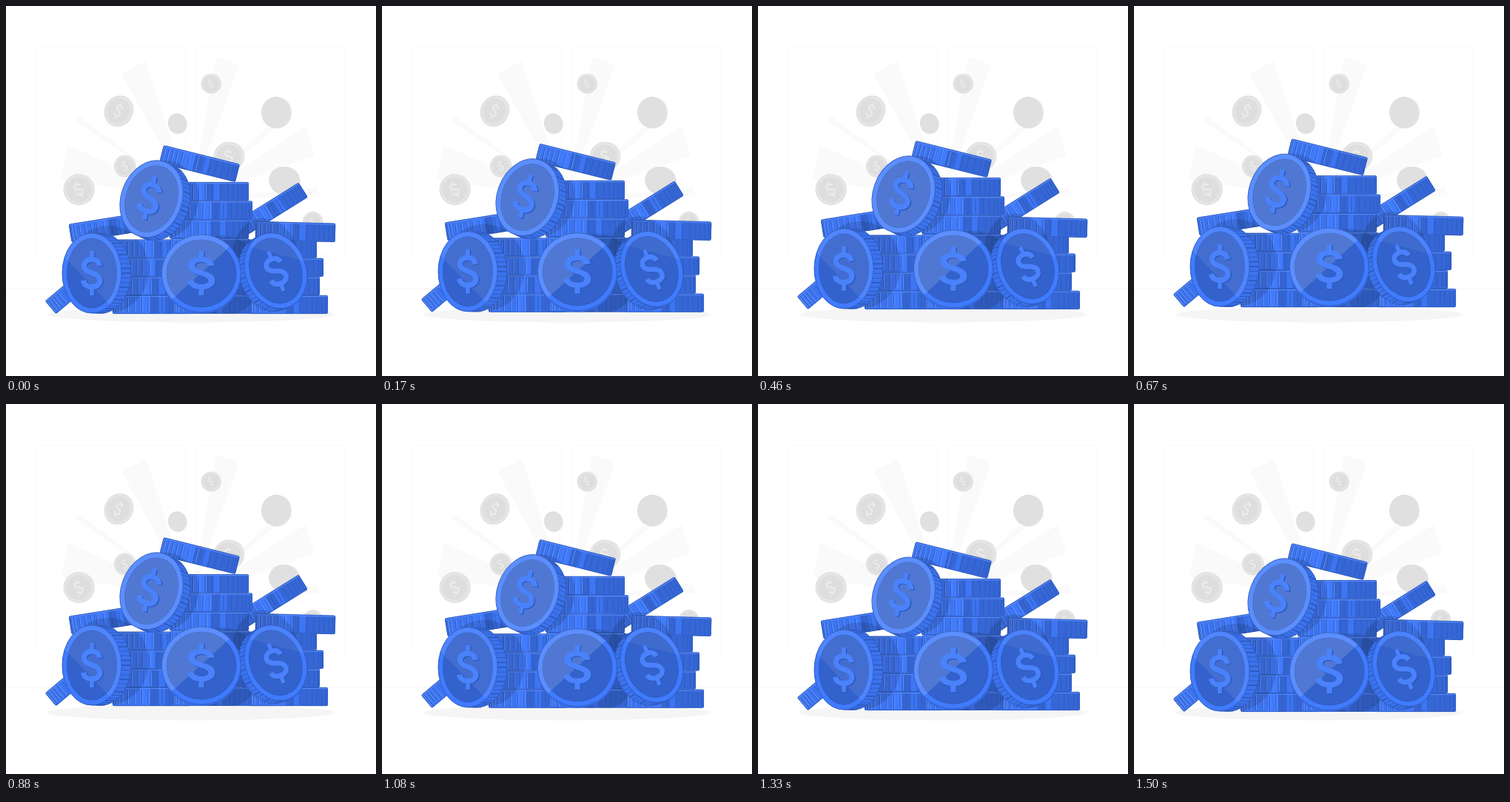
Recreate the animation shown at these times as an HTML page with a canvas. Size 500 px wide and 500 px high, loop 1540 ms.

```html
<!DOCTYPE html>
<html lang="en">
<head>
<meta charset="utf-8">
<title>Coin pile</title>
<style>
html, body { margin: 0; width: 100%; height: 100%; overflow: hidden; background: #fff; }
canvas { display: block; position: absolute; left: 0; top: 0; width: 500px; height: 500px; }
</style>
</head>
<body>
<canvas id="back"></canvas>
<canvas id="pile"></canvas>
<script>
const LOOP = 1540, STEP = 1000 / 24, TAU = Math.PI * 2;
const BLUE = '#407bff', DEEP = '#3362cc', LINE = '#2f5cc0', SHINE = '#6694ff';
const ratio = Math.max(1, window.devicePixelRatio || 1);
let g;

function context(id) {
  const c = document.getElementById(id);
  c.width = c.height = Math.round(500 * ratio);
  const ctx = c.getContext('2d');
  ctx.scale(ratio, ratio);
  return ctx;
}

function at(x, y, deg, draw) {
  g.save();
  g.translate(x, y);
  g.rotate(deg * Math.PI / 180);
  draw();
  g.restore();
}

function oval(x, y, rx, ry, fill, stroke, width = 1) {
  g.beginPath();
  g.ellipse(x, y, rx, ry, 0, 0, TAU);
  if (fill) { g.fillStyle = fill; g.fill(); }
  if (stroke) { g.strokeStyle = stroke; g.lineWidth = width; g.stroke(); }
}

function poly(points, fill) {
  g.beginPath();
  points.forEach(([x, y]) => g.lineTo(x, y));
  g.closePath();
  g.fillStyle = fill;
  g.fill();
}

function segment(x1, y1, x2, y2) {
  g.beginPath();
  g.moveTo(x1, y1);
  g.lineTo(x2, y2);
  g.stroke();
}

// Dollar sign, 28 x 60 at scale 1, centred on the current origin
function dollar(sx, sy, color) {
  g.save();
  g.scale(sx, sy);
  g.strokeStyle = color;
  g.lineWidth = 7;
  g.beginPath();
  g.moveTo(10.5, -10);
  g.bezierCurveTo(9.5, -16, 5, -18.5, 0, -18.5);
  g.bezierCurveTo(-6, -18.5, -10.5, -15.5, -10.5, -10);
  g.bezierCurveTo(-10.5, -4.5, -5, -2, 0, -.3);
  g.bezierCurveTo(5.5, 1.5, 11, 4, 11, 10);
  g.bezierCurveTo(11, 15.5, 6, 18.5, 0, 18.5);
  g.bezierCurveTo(-5.5, 18.5, -10.5, 16, -11.5, 10);
  g.stroke();
  g.lineWidth = 5.5;
  segment(0, -30, 0, -17);
  segment(0, 17, 0, 30);
  g.restore();
}

/* ---------- still background ---------- */

function greyCoin(x, y, rx, ry, deg, side, marked) {
  at(x + side, y, deg, () => oval(0, 0, rx, ry, '#efefef'));
  at(x, y, deg, () => {
    oval(0, 0, rx, ry, '#e0e0e0');
    if (!marked) return;
    oval(0, 0, rx - 1, ry - 1, '#e5e5e5');
    oval(0, 0, rx * .8, ry * .8, '#dedede');
    g.translate(.6, .4);
    dollar(rx / 54, ry / 54, '#d2d2d2');
    g.translate(-.6, -.4);
    dollar(rx / 54, ry / 54, '#ebebeb');
  });
}

function drawBack() {
  g = context('back');
  g.fillStyle = '#fff';
  g.fillRect(0, 0, 500, 500);
  g.strokeStyle = '#fafafa';
  g.lineWidth = 1;
  g.strokeRect(39.5, 55.5, 203, 282);
  g.strokeRect(255.5, 55.5, 202, 282);
  g.strokeStyle = '#f6f6f6';
  segment(0, 382.5, 500, 382.5);

  const rays = [
    [156, 91, 189, 74], [284, 69, 315, 79], [84, 188, 74, 234], [93, 155, 99, 149],
    [405, 163, 417, 202], [352, 164, 363, 166], [421, 245, 423, 256]
  ];
  for (const [a, b, c, d] of rays) poly([[a, b], [c, d], [250, 262]], '#fafafa');

  greyCoin(152, 142, 19, 21.5, 25, 1.5, true);
  greyCoin(277, 105, 13.5, 13.5, -20, .8, true);
  greyCoin(231.5, 159, 12.5, 14, -15, 1);
  greyCoin(365, 144, 20, 21.5, 0, 1.5);
  greyCoin(376, 236, 21, 19, 10, 1.5);
  greyCoin(160.5, 216.5, 14.5, 15, -15, 1, true);
  greyCoin(98.5, 248, 21, 21, -25, .6, true);
  greyCoin(301, 203.5, 20.5, 20, -10, 1.5, true);
  greyCoin(414.5, 291.5, 13.5, 13.5, -10, .8, true);

  oval(250, 417, 194, 10.5, '#f5f5f5');
}

/* ---------- floating pile ---------- */

// Coin seen from the side, centred; seed varies the shading
function edge(x, y, w, h, deg, seed) {
  at(x, y, deg, () => {
    const l = -w / 2, t = -h / 2;
    g.save();
    g.beginPath();
    g.roundRect(l, t, w, h, 2);
    g.clip();
    g.fillStyle = BLUE;
    g.fillRect(l, t, w, h);
    const shift = (seed * 37 % 11) / 100;
    const shade = (from, to, alpha) => {
      g.fillStyle = `rgba(0,0,0,${alpha})`;
      g.fillRect(l + from * w, t, (to - from) * w, h);
    };
    shade(0, .3 + shift, .06);
    shade(.43 + shift, .54 + shift, .18);
    shade(.54 + shift, .62 + shift, .05);
    shade(.62 + shift, 1, .16);
    for (let i = 1; i < 17; i++) {
      const px = -Math.cos(Math.PI * i / 17) * w / 2 + Math.sin(i * 5 + seed);
      g.lineWidth = 1;
      g.strokeStyle = LINE;
      segment(px, t + 3, px, -t - 2);
      if (i > 8) continue;
      g.strokeStyle = SHINE;
      segment(px + 1.1, t + 3, px + 1.1, -t - 2);
    }
    g.fillStyle = '#5b8dff';
    g.fillRect(l, t + .8, w, 1.2);
    g.restore();
    g.beginPath();
    g.roundRect(l + .4, t + .4, w - .8, h - .8, 2);
    g.strokeStyle = LINE;
    g.lineWidth = .9;
    g.stroke();
  });
}

// Level coins, listed as [left, right], stacked downwards from a given top
function stack(top, pitch, seed, coins) {
  coins.forEach(([l, r], i) =>
    edge((l + r) / 2, top + (i + .5) * pitch, r - l, pitch, 0, seed + i));
}

function shadow(x, y, rx, ry, deg) {
  g.globalCompositeOperation = 'source-atop';
  at(x, y, deg, () => oval(0, 0, rx, ry, 'rgba(0,0,0,.13)'));
  g.globalCompositeOperation = 'source-over';
}

// Coin facing the viewer; (dx, dy) is its thickness, light the glossy area
function coin({ x, y, rx, ry, deg, dx, dy, mark, light, gloss }) {
  for (let k = 1; k >= 0; k -= .1) {
    at(x + dx * k, y + dy * k, deg, () => oval(0, 0, rx, ry, '#3c73ee', k === 1 && LINE));
  }
  const rot = deg * Math.PI / 180, cos = Math.cos(rot), sin = Math.sin(rot);
  if (Math.hypot(dx, dy) > 3) {
    for (let i = 0; i < 52; i++) {
      const a = i / 52 * TAU, u = Math.cos(a), v = Math.sin(a);
      const nx = ry * u * cos - rx * v * sin, ny = ry * u * sin + rx * v * cos;
      if (nx * dx + ny * dy <= 0) continue;
      const px = x + rx * u * cos - ry * v * sin, py = y + rx * u * sin + ry * v * cos;
      g.strokeStyle = LINE;
      g.lineWidth = i % 3 ? 1 : 2;
      segment(px, py, px + dx, py + dy);
    }
  }
  at(x, y, deg, () => {
    oval(0, 0, rx, ry, BLUE, LINE);
    oval(0, 0, rx - 6.5, ry - 7, DEEP, LINE);
  });
  g.save();
  g.beginPath();
  g.ellipse(x, y, rx, ry, rot, 0, TAU);
  g.clip();
  poly(light, `rgba(255,255,255,${gloss})`);
  g.restore();
  const [mx, my, tilt, sx, sy] = mark;
  at(mx + 1.5, my + 1.2, tilt, () => dollar(sx, sy, '#2f5bbd'));
  at(mx, my, tilt, () => dollar(sx, sy, '#4a82fb'));
}

function drawPile(lift) {
  g.clearRect(0, 0, 500, 500);
  g.save();
  g.translate(0, lift);

  edge(138, 299, 104, 25, -9, 2);
  edge(100, 374, 104, 23, -40, 5);
  stack(315.6, 25.1, 1, [[150, 256], [147, 253], [148, 254], [144, 250]]);
  edge(261.5, 213, 106, 25, 14, 0);
  edge(357.5, 276, 104, 23.5, -32, 4);
  stack(315.6, 25.1, 6, [[314, 420], [324, 429], [318, 424], [328, 435]]);
  edge(391, 305, 108, 25.5, 1.5, 3);
  stack(238, 25.4, 3, [[222, 328], [227, 333], [221, 328], [222, 329], [224, 331], [222, 328], [225, 331]]);

  shadow(138, 356, 55, 59, 0);
  shadow(211, 262, 49, 54, 18);
  shadow(290, 365, 56, 55, 0);
  shadow(352, 344, 45, 58, -12);

  coin({
    x: 196.6, y: 260.7, rx: 41, ry: 53, deg: 20, dx: 10, dy: 4.5, gloss: .14,
    light: [[140, 200], [260, 200], [260, 320], [140, 320]],
    mark: [194, 259.5, 14, 1, 1]
  });
  coin({
    x: 116, y: 361, rx: 40, ry: 54, deg: 0, dx: 13, dy: 0, gloss: .08,
    light: [[70, 330], [145, 408], [180, 420], [180, 300], [70, 300]],
    mark: [116, 361, 0, 1, 1]
  });
  coin({
    x: 364.4, y: 357.8, rx: 41, ry: 52, deg: -20, dx: -8, dy: 4, gloss: .06,
    light: [[300, 318], [420, 349], [420, 290], [300, 290]],
    mark: [365, 358.5, -21, .95, .95]
  });
  coin({
    x: 264, y: 361.5, rx: 53.5, ry: 52.5, deg: 0, dx: 0, dy: 1.5, gloss: .14,
    light: [[205, 414], [320, 309], [320, 300], [200, 300]],
    mark: [264, 361, 0, 1.27, 1]
  });
  g.restore();
}

// Steady rise, steady fall, short rest
function liftAt(ms) {
  const path = [[0, 0], [735, -9.8], [1480, 0], [LOOP, 0]];
  const i = path.findIndex(([t]) => t > ms);
  const [t0, y0] = path[i - 1], [t1, y1] = path[i];
  return y0 + (y1 - y0) * (ms - t0) / (t1 - t0);
}

drawBack();
g = context('pile');
const start = performance.now();
let last = -1;

function tick() {
  const ms = Math.max(0, performance.now() - start) % LOOP;
  const step = Math.min(36, Math.floor(ms / STEP + .1));
  if (step !== last) drawPile(liftAt(step * STEP));
  last = step;
  requestAnimationFrame(tick);
}
tick();
</script>
</body>
</html>
```
